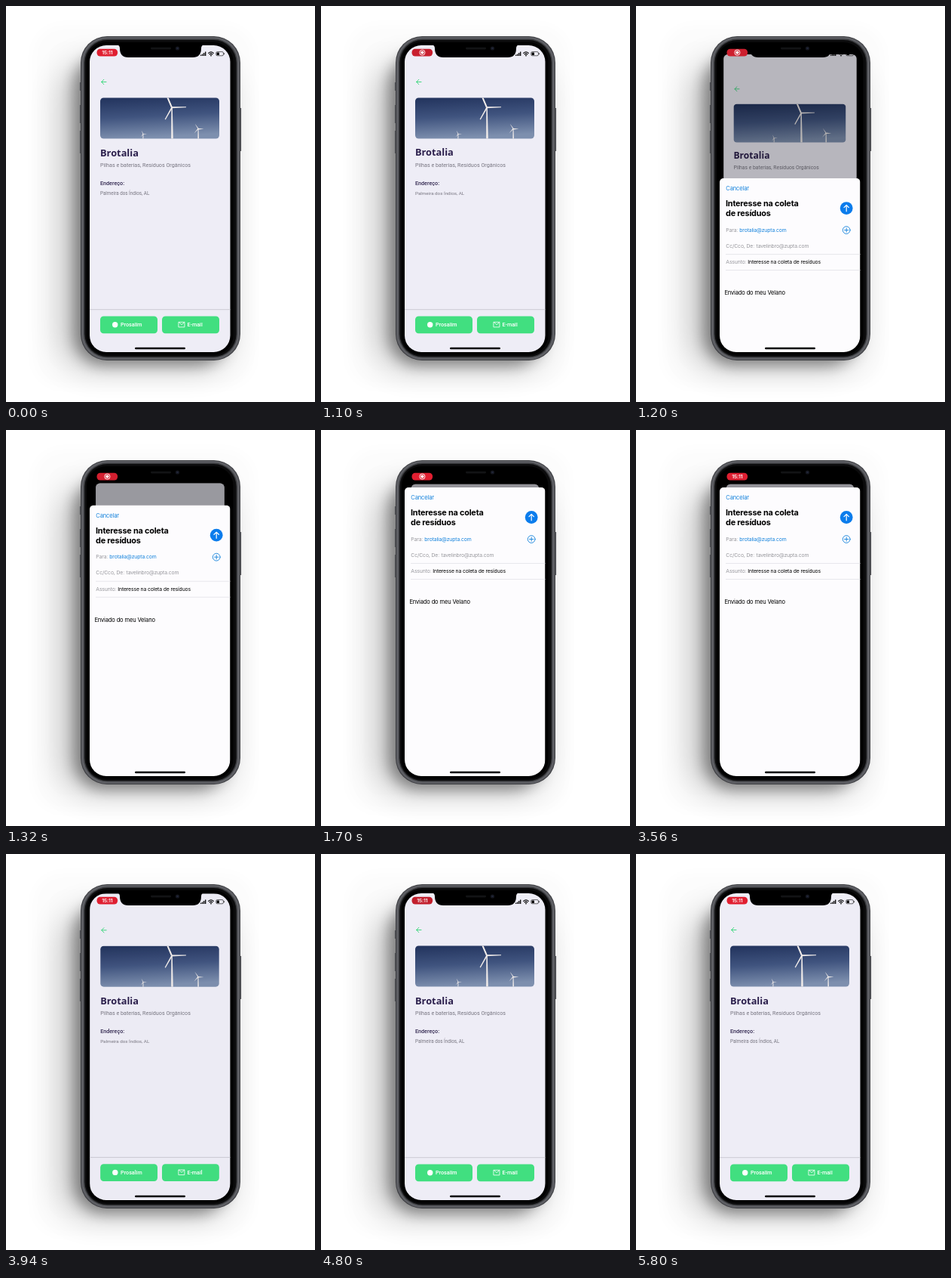
Recreate the animation shown at these times as an HTML page. Size 410x524 px, loop 5880 ms.

```html
<!DOCTYPE html>
<html lang="pt">
<head>
<meta charset="utf-8">
<style>
html, body { margin: 0; width: 100%; height: 100%; overflow: hidden; background: #fff; }
svg { display: block; width: 410px; height: 524px; }
text { font-family: Roboto, sans-serif; }
.mail text, .clock { font-family: Inter, sans-serif; font-size: 6.85px; letter-spacing: -.02em; }
.mail .title { font-size: 10.9px; font-weight: 700; }
.mail .big { font-size: 7.55px; }
.grey { fill: #97979c; }
.blue { fill: #1583dc; }
.line { fill: none; stroke-linecap: round; stroke-linejoin: round; }
</style>
</head>
<body>
<svg viewBox="0 0 410 524">
  <defs>
    <linearGradient id="sky" x1="0" y1="0" x2=".15" y2="1">
      <stop stop-color="#21325c"/><stop offset=".5" stop-color="#40547f"/><stop offset="1" stop-color="#7d8fae"/>
    </linearGradient>
    <filter id="soft" x="-50%" y="-30%" width="200%" height="160%"><feGaussianBlur stdDeviation="9"/></filter>
    <filter id="wide" x="-50%" y="-30%" width="200%" height="160%"><feGaussianBlur stdDeviation="20"/></filter>
    <clipPath id="screen"><rect x="111" y="52" width="186.5" height="406" rx="22"/></clipPath>
    <clipPath id="photo"><rect x="125" y="121.5" width="158" height="54" rx="4.5"/></clipPath>
  </defs>

  <rect x="35" y="25" width="295" height="480" rx="40" opacity=".012" filter="url(#soft)"/>
  <rect x="72" y="75" width="225" height="405" rx="40" opacity=".22" filter="url(#wide)"/>
  <rect x="90" y="64" width="205" height="412" rx="40" opacity=".36" filter="url(#soft)"/>

  <!-- phone body -->
  <path d="M98.7 101v11M98.7 131v24M98.7 165v30M311.3 135v57" stroke="#55565b" stroke-width="1.6"/>
  <rect x="99" y="40" width="212" height="429" rx="35" fill="#3b3c40"/>
  <rect x="100" y="41" width="210" height="427" rx="34" fill="#5e5f64"/>
  <rect x="103" y="43.5" width="204" height="422" rx="31.5" fill="#37383b"/>
  <rect x="104.5" y="45" width="201" height="419" rx="30" fill="#0b0b0c"/>
  <rect x="107" y="48" width="194.5" height="413.5" rx="26"/>

  <g clip-path="url(#screen)">
    <g id="page">
      <rect x="111" y="52" width="187" height="410" rx="6" fill="#eeedf6"/>
      <path class="line" d="M133 100.5h-6.4m3.2-3.2-3.2 3.2 3.2 3.2" stroke="#42d982"/>
      <g clip-path="url(#photo)">
        <rect x="125" y="121" width="158" height="55" fill="url(#sky)"/>
        <g fill="#f1ecea">
          <path d="M219.4 134h1.4l1 42h-2.6z"/>
          <path d="M219 134.5l-6-14 2-.5 6 14zM220 133l19 .2v1l-19 1zM219.3 134l1.4 1-9 15.5-1-.8z"/>
          <path d="M254.6 162h.9l.5 14h-1.6zM254.5 162.5l-4-7 5 6.5zM255 161.7l7.5 1-7.5.7zM254.5 162l1 .8-6 5.7z"/>
          <path d="M181.6 169h.8v7h-1zM181.6 169.5l-2-5 3 5zM182 168.7l5 .6-5 .5zM181.6 169l.8.5-3.5 4z"/>
        </g>
      </g>
      <text x="125" y="198.5" font-size="12.8" font-weight="700" fill="#2b1f4c" style="font-family:'Noto Sans',sans-serif">Brotalia</text>
      <text x="125" y="212.8" font-size="7.2" fill="#777580">Pilhas e baterias, Resíduos Orgânicos</text>
      <text x="125" y="237" font-size="7.2" font-weight="500" fill="#322850">Endereço:</text>
      <text x="125" y="249.8" font-size="6.27" fill="#777580">Palmeira dos Índios, AL</text>
      <path d="M111 401.7h187" stroke="#c9c8d0" stroke-width=".9"/>
      <g fill="#41df80">
        <rect x="125" y="410.5" width="76" height="22.8" rx="4.5"/>
        <rect x="207" y="410.5" width="76" height="22.8" rx="4.5"/>
      </g>
      <g fill="#fff" font-size="7.2" font-weight="500">
        <circle cx="144.7" cy="421.7" r="3.7"/>
        <text x="152" y="424.2">Prosalim</text>
        <text x="240.5" y="424.2">E-mail</text>
      </g>
      <path class="line" d="M229.3 418.3h7.6v6.6h-7.6zl3.8 3.4 3.8-3.4" stroke="#fff" stroke-width=".8"/>
      <rect id="dim" x="111" y="52" width="187" height="410" rx="6"/>
    </g>

    <!-- status icons, lost against the black when the page shrinks -->
    <path d="M258.7 66v-1.5M260.7 66v-2.6M262.7 66v-4M264.7 66v-5.4" stroke="#000" stroke-width="1.3"/>
    <path class="line" d="M268.6 62.4q3.4-3 6.8 0M270 64q2-1.7 4 0" stroke="#000" stroke-width="1.1"/>
    <circle cx="272" cy="65.5" r=".9"/>
    <rect x="278.8" y="60.6" width="9.6" height="5.2" rx="1.5" fill="none" stroke="#000" stroke-width=".6"/>
    <rect x="279.6" y="61.4" width="3.4" height="3.6" rx=".6"/>
    <path d="M289.4 62.2v2" stroke="#000" stroke-width=".7"/>

    <g id="sheet" class="mail">
      <rect x="111" y="76" width="186.5" height="400" rx="5" fill="#fdfcfe"/>
      <text class="big blue" x="119.3" y="92">Cancelar</text>
      <text class="title" x="119" y="113">Interesse na coleta</text>
      <text class="title" x="119" y="126">de resíduos</text>
      <circle cx="279.2" cy="115.5" r="8.4" fill="#0b7cec"/>
      <path class="line" d="M279.2 119.7v-8.2m-3.2 3.1 3.2-3.2 3.2 3.2" stroke="#fff" stroke-width="1.2"/>
      <text class="grey" x="119.3" y="146.5">Para:</text>
      <text class="blue" x="137.3" y="146.5">brotalia@zupta.com</text>
      <g class="line" stroke="#1583dc" stroke-width=".9">
        <circle cx="279.2" cy="144.5" r="4.9"/>
        <path d="M276.6 144.5h5.2M279.2 141.9v5.2"/>
      </g>
      <text class="grey" x="119.3" y="167.6">Cc/Cco, De:</text>
      <text class="grey" x="159.5" y="167.6">tavelinbro@zupta.com</text>
      <path d="M119 176.5h179M119 197.5h179" stroke="#e3e3e7" stroke-width=".8"/>
      <text class="grey" x="119.3" y="189">Assunto:</text>
      <text x="148.3" y="189">Interesse na coleta de resíduos</text>
      <text class="big" x="117.4" y="230">Enviado do meu Velano</text>
    </g>
    <rect x="171" y="451.7" width="67" height="2.5" rx="1.25"/>
  </g>

  <!-- notch -->
  <path d="M147 51q4 1 4 5q0 12 11 12H248q11 0 11-12q0-4 4-5z"/>
  <rect x="192" y="54.8" width="27" height="2.6" rx="1.3" fill="#121315"/>
  <circle cx="227.5" cy="56" r="2.6" fill="#15171f"/>
  <circle cx="227.5" cy="56" r="1" fill="#262c42"/>

  <rect id="pill" x="120.5" y="56.7" width="27.6" height="9.9" rx="4.5"/>
  <text id="clock" class="clock" x="134.4" y="64.2" text-anchor="middle" fill="#fff" font-weight="600">15:11</text>
  <g id="rec" fill="#fff">
    <circle cx="134.4" cy="61.6" r="3.6" fill="none" stroke="#fff" stroke-width=".9"/>
    <circle cx="134.4" cy="61.6" r="2.1"/>
  </g>
</svg>
<script>
const LOOP = 5880, OPEN = 1100, CLOSE = 3660;
const el = id => document.getElementById(id);
const [page, dim, sheet, pill, clock, rec] =
  ['page', 'dim', 'sheet', 'pill', 'clock', 'rec'].map(el);
const ramp = (t, start, len) => Math.min(1, Math.max(0, (t - start) / len));

// Critically damped spring from 0 to 1
function spring(ms) {
  const k = Math.max(0, ms) * .0204;
  return 1 - (1 + k) * Math.exp(-k);
}

function draw(now) {
  const t = now % LOOP;
  const p = spring(t - OPEN) - spring(t - CLOSE);
  const s = 1 - .093 * p;
  page.setAttribute('transform',
    `translate(${203.5 * (1 - s)} ${52 * (1 - s) + 19.8 * p}) scale(${s})`);
  dim.setAttribute('opacity', .38 * p);
  sheet.setAttribute('transform', `translate(0 ${390 * (1 - p)})`);

  const glow = .5 + .5 * Math.cos((t - 1800) / LOOP * 6 * Math.PI);
  pill.setAttribute('fill', `rgb(${194 + 32 * glow} 31 ${45 + 4 * glow})`);
  const r = ramp(t, 600, 200) - ramp(t, 2500, 200);
  rec.setAttribute('opacity', r);
  clock.setAttribute('opacity', 1 - r);
  requestAnimationFrame(draw);
}
draw(0);
</script>
</body>
</html>
```
